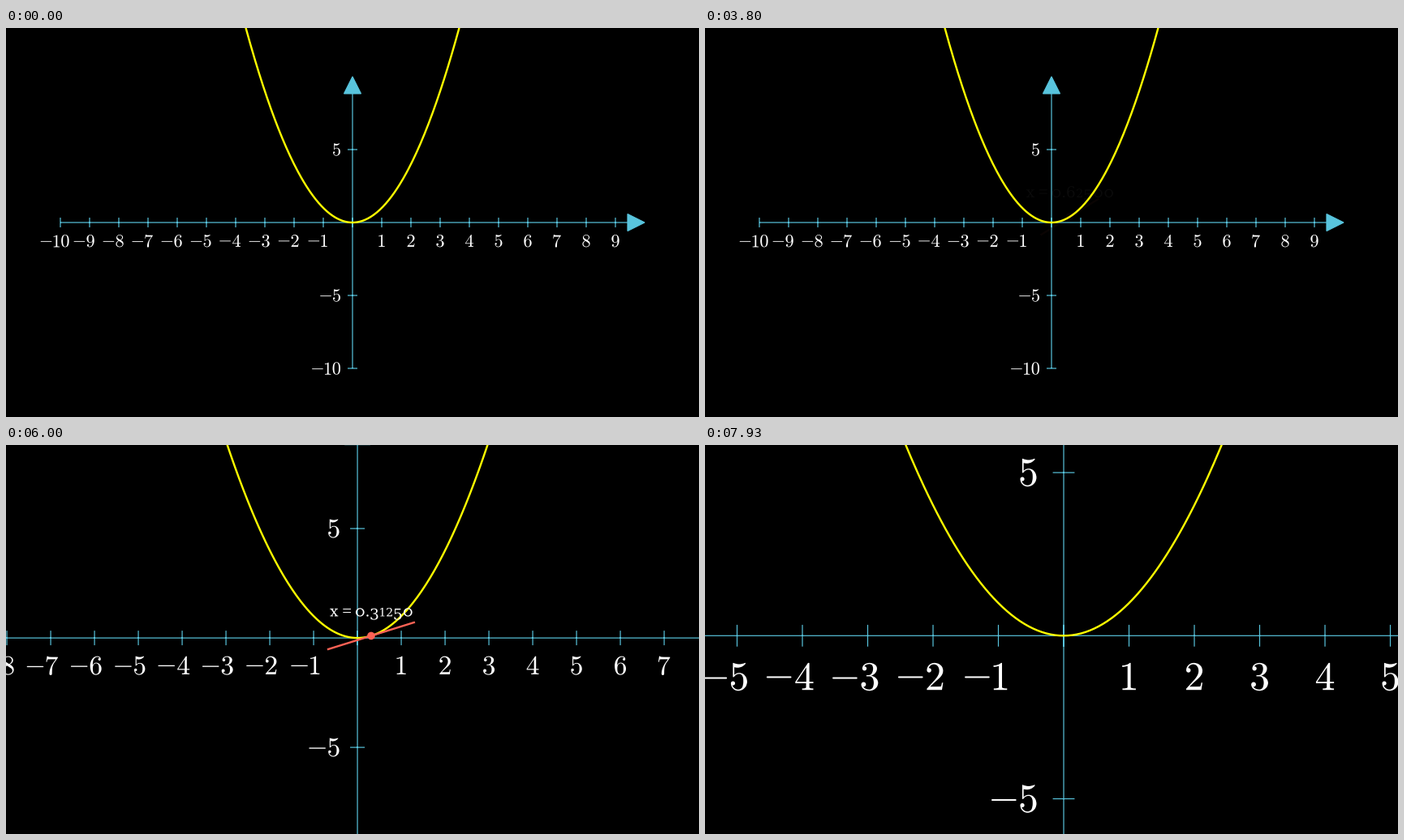
These frames come from a looping animation (854x480 px, 8000 ms). A matplotlib script:

```python
import matplotlib.pyplot as plt
import numpy as np
from matplotlib.animation import FuncAnimation
from matplotlib.patches import Circle, PathPatch
from matplotlib.path import Path
from matplotlib.textpath import TextPath
from matplotlib.transforms import Affine2D

plt.rcParams["mathtext.fontset"] = "cm"

W, H, DPI = 854, 480, 64
FRAMES, LOOP = 120, 8000
OX, OY, UX, UY = 427, 240, 36, 18      # origin and unit sizes in pixels
PIVOT = np.array([414.85, 243.8])      # centre of the scaled plot
BLUE, RED, YELLOW = "#58C4DD", "#FC6255", "#FFFF00"
STEPS = [(1, 1.25), (3, 0.625), (6, 0.3125)]   # start second, x
ZOOMS = [4, 7]
DOT_R, GAP = 4.8, 15

fig = plt.figure(figsize=(W / DPI, H / DPI), dpi=DPI, facecolor="black")
ax = fig.add_axes([0, 0, 1, 1])
ax.set(xlim=(0, W), ylim=(H, 0))
ax.axis("off")

zoom = Affine2D()
zoomed = zoom + ax.transData


def px(width):
    return width * 72 / DPI


def to_px(x, y):
    return OX + UX * x, OY - UY * y


def smooth(t):
    def sig(v):
        return 1 / (1 + np.exp(-v))
    t, e = np.clip(t, 0, 1), sig(-5)
    return np.clip((sig(10 * (t - 0.5)) - e) / (1 - 2 * e), 0, 1)


def moved(path, dx, dy):
    return Affine2D().translate(dx, dy).transform_path(path)


def stroke(path, color, width, z, **kw):
    return ax.add_patch(PathPatch(path, fc="none", ec=color, lw=px(width),
                                  transform=zoomed, snap=False, zorder=z, **kw))


def glyph(text, size, family="DejaVu Serif"):
    """Glyph outline with y pointing down and its ink starting at x = 0."""
    t = TextPath((0, 0), text, size=size, prop={"family": family})
    p = Affine2D().scale(1, -1).transform_path(Path(t.vertices, t.codes))
    return moved(p, -p.get_extents().x0, 0)


# Axis numbers
def number(n):
    parts, x = [], 0
    for ch in str(n):
        p = glyph(f"${ch}$", 22.4)
        box = p.get_extents()
        dy = -7.5 - box.y0 if ch == "-" else -box.y1
        parts.append(moved(p, x, dy))
        x += box.width + 2.16
    return Path.make_compound_path(*parts)


def add_number(n, vertical):
    p = number(n)
    box = p.get_extents()
    if vertical:
        dx = OX - GAP - box.x1
        dy = to_px(0, n)[1] - (box.y0 + box.y1) / 2
    else:
        shift = 6.85 if n < 0 else 0
        dx = to_px(n, 0)[0] - shift - box.width / 2
        dy = OY + GAP - box.y0
    ax.add_patch(PathPatch(moved(p, dx, dy), fc="white", lw=0,
                           transform=zoomed, snap=False, zorder=2))


# Axes
def segments(pairs):
    return Path(np.reshape(pairs, (-1, 2)), [Path.MOVETO, Path.LINETO] * len(pairs))


left, right = to_px(-10, 0)[0], to_px(10, 0)[0]
top, bottom = to_px(0, 10)[1], to_px(0, -10)[1]
TIP = 21
lines = [((left, OY), (right - TIP, OY)), ((OX, bottom), (OX, top + TIP))]
for n in range(-10, 10):
    x = to_px(n, 0)[0]
    lines.append(((x, OY - 6), (x, OY + 6)))
    if n:
        add_number(n, False)
for n in (-10, -5, 5):
    y = to_px(0, n)[1]
    lines.append(((OX - 6, y), (OX + 6, y)))
    add_number(n, True)
stroke(segments(lines), BLUE, 1.2, 1)

for tip in ([(right, OY), (right - TIP, OY - TIP / 2), (right - TIP, OY + TIP / 2)],
            [(OX, top), (OX - TIP / 2, top + TIP), (OX + TIP / 2, top + TIP)]):
    stroke(Path(tip + tip[:1], closed=True), BLUE, 1.2, 1,
           joinstyle="miter").set_facecolor(BLUE)

xs = np.linspace(-5, 5, 301)
stroke(Path(np.column_stack(to_px(xs, xs ** 2))), YELLOW, 2.4, 3)


# Read-out with old-style figures
def zero():
    a = np.linspace(0, 2 * np.pi, 61)

    def loop(rx, ry, s):
        return Path(np.column_stack([5.3 + rx * np.cos(a), -5 + s * ry * np.sin(a)]),
                    closed=True)
    return Path.make_compound_path(loop(5.3, 5.2, 1), loop(3.5, 4.1, -1))


def figure(ch):
    if ch == "0":
        return zero()
    if ch == "=":
        return glyph(ch, 20.8, "Liberation Serif")
    if ch in "12":
        return glyph(ch, 14.2)
    return moved(glyph(ch, 18.6), 0, 4 if ch in "34579" else 0)


def readout(text):
    parts, x = [], 0
    for ch in text:
        if ch == " ":
            x += 3.3
            continue
        p = figure(ch)
        parts.append(moved(p, x, 0))
        x += p.get_extents().width + 2.7
    path = Path.make_compound_path(*parts)
    box = path.get_extents()
    return moved(path, -(box.x0 + box.x1) / 2, -box.y1)


readouts = [readout(f"x = {x:.5f}") for _, x in STEPS]
tangent = stroke(segments([((0, 0), (1, 1))]), RED, 2.4, 4)
dot = ax.add_patch(Circle((0, 0), DOT_R, fc=RED, lw=0, zorder=5))
place = Affine2D()
label = ax.add_patch(PathPatch(readouts[0], fc="white", lw=0, snap=False,
                               transform=place + ax.transData, zorder=6))


def draw(i):
    t = i * LOOP / FRAMES / 1000
    k = np.prod([1 + 0.5 * smooth(t - z) for z in ZOOMS])
    zoom.clear().translate(*-PIVOT).scale(k).translate(*PIVOT)

    marks = (tangent, dot, label)
    for m in marks:
        m.set_visible(False)
    for (start, x), path in zip(STEPS, readouts):
        age = t - start
        if not -1e-6 < age < 1 - 1e-6:
            continue
        ends = [to_px(x + d, x * x + 2 * x * d) for d in (-1, 1)]
        tangent.set_path(segments([ends]))
        cx, cy = zoom.transform(to_px(x, x * x))
        dot.center = cx, cy
        label.set_path(path)
        place.clear().translate(cx, cy - DOT_R - GAP)
        for m in marks:
            m.set_visible(True)
            m.set_alpha(float(1 - smooth(age)))
    return marks


anim = FuncAnimation(fig, draw, frames=FRAMES, interval=LOOP / FRAMES,
                     repeat=True, repeat_delay=0, blit=False)
plt.show()
```
